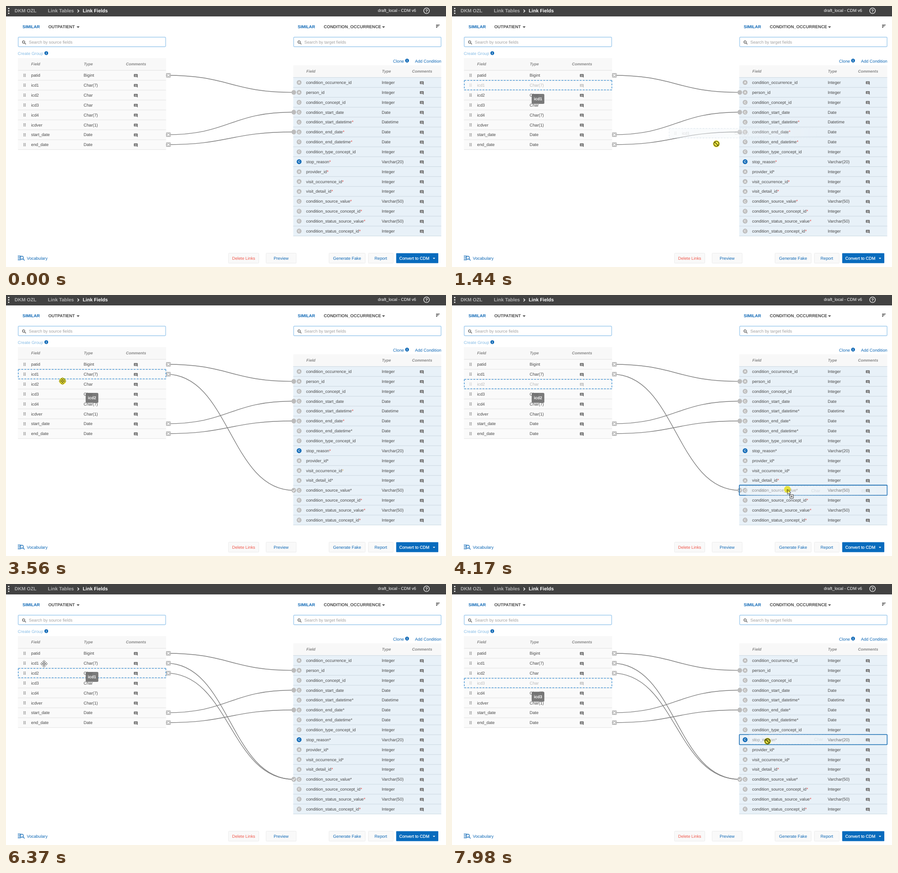
An HTML page that plays this animation: 972 by 576 pixels, repeating every 8 s.

```html
<!DOCTYPE html>
<html lang="en">
<head>
<meta charset="utf-8">
<title>Link Fields</title>
<style>
  html, body { margin: 0; width: 100%; height: 100%; overflow: hidden; background: #fff; }
  svg { display: block; }
  text { font: 9.28px "Liberation Sans", Arial, sans-serif; fill: #484848; text-rendering: geometricPrecision; }
  .b { font-weight: bold; }
  .h { font: italic bold 8.6px "Liberation Sans", Arial, sans-serif; fill: #858585; }
  .top { font-size: 10.6px; font-weight: bold; fill: #b0b0b0; }
  .blue { fill: #0d67b5; }
  .white { fill: #fff; }
  .hint { fill: #a2a2a2; }
  .mid { text-anchor: middle; }
  .badge { font-size: 7px; font-weight: bold; fill: #fff; text-anchor: middle; }
</style>
</head>
<body>
<svg width="972" height="576" viewBox="0 0 972 576">
  <defs>
    <g id="note">
      <path d="M-3.2-3.6h6.6a.8.8 0 0 1 .8.8v7.2l-2-1.9h-5.4a.8.8 0 0 1-.8-.8v-4.5a.8.8 0 0 1 .8-.8z" fill="#5f5f5f"/>
      <path d="M-2.4-1.8h5M-2.4-.3h5M-2.4 1.2h5" stroke="#eee" stroke-width=".7"/>
    </g>
    <g id="grip" fill="#666">
      <path d="M-2.2-3.2h1.5v1.5h-1.5zM.8-3.2h1.5v1.5h-1.5zM-2.2-.7h1.5v1.5h-1.5zM.8-.7h1.5v1.5h-1.5zM-2.2 1.8h1.5v1.5h-1.5zM.8 1.8h1.5v1.5h-1.5z"/>
    </g>
    <g id="lens" fill="none" stroke="#555" stroke-width="1.2">
      <circle cx="-1" cy="-1" r="2.6"/><path d="M1 1l3 3"/>
    </g>
    <g id="info">
      <circle r="4.2" fill="#0d67b5"/><path d="M0-2.4v1.2M0-.4v2.8" stroke="#fff" stroke-width="1.2"/>
    </g>
    <path id="caret" d="M-3.3-1.6h6.6l-3.3 3.4z"/>
    <g id="cross">
      <rect x="-5" y="-5" width="10" height="10" rx="1" fill="#bcbcbc"/>
      <path d="M-2.6-2.6l5.2 5.2M2.6-2.6l-5.2 5.2" stroke="#fff" stroke-width="1.3"/>
    </g>
    <path id="arrow" d="M0 0V11L2.6 8.7 4.6 12.7 6.3 11.9 4.4 8H7.8Z" fill="#fff" stroke="#222" stroke-width=".9"/>
    <g id="copy">
      <use href="#arrow"/>
      <rect x="5.5" y="11.8" width="7.6" height="7.6" fill="#fff" stroke="#222" stroke-width=".9"/>
      <path d="M7.2 15.6h4.2M9.3 13.5v4.2" stroke="#222"/>
    </g>
    <g id="move" fill="#fff" stroke="#444" stroke-width=".8">
      <path d="M0-7.8l3 3.2h-2v2.3h-2v-2.3h-2zM0 7.8l3-3.2h-2v-2.3h-2v2.3h-2zM-7.8 0l3.2-3v2h2.3v2h-2.3v2zM7.8 0l-3.2-3v2h-2.3v2h2.3v2z"/>
      <circle r="1.7"/>
    </g>
    <g id="deny" fill="none" stroke="#333" stroke-width="1.3">
      <circle r="5.6"/><path d="M-4-4l8 8"/>
    </g>
  </defs>
  <g id="fixed"></g>
  <g id="live"></g>
</svg>
<script>
const LOOP = 8000, PITCH = 21.86, LEFT = 142, RIGHT = 157.8;
const BLUE = '#0d67b5', GRAY = '#bcbcbc';
const fixed = document.getElementById('fixed'), live = document.getElementById('live');

const source = ['patid Bigint', 'icd1 Char(7)', 'icd2 Char', 'icd3 Char', 'icd4 Char(7)',
  'icdver Char(1)', 'start_date Date', 'end_date Date'].map(s => s.split(' '));
const target = ['A condition_occurrence_id Integer', 'A person_id Integer', 'C condition_concept_id Integer',
  'C condition_start_date Date', 'C condition_start_datetime* Datetime', 'C condition_end_date* Date',
  'C condition_end_datetime* Date', 'C condition_type_concept_id Integer', 'C stop_reason* Varchar(20)',
  'A provider_id* Integer', 'A visit_occurrence_id* Integer', 'A visit_detail_id* Integer',
  'C condition_source_value* Varchar(50)', 'C condition_source_concept_id* Integer',
  'C condition_status_source_value* Varchar(50)', 'C condition_status_concept_id* Integer'].map(s => s.split(' '));
const leftY = i => LEFT + PITCH * (i + .5);
const rightY = i => RIGHT + PITCH * (i + .5);

// Time from which the asterisk of a row is dark
const darkFrom = {4: 4000, 5: 4000, 6: 1500, 8: 4000, 9: 1400, 10: 4000, 11: 1500, 12: 1700};
// [source row, target row, start]
const links = [[0, 1, 0], [6, 3, 0], [7, 5, 0], [1, 12, 2500], [2, 12, 4790]];
// [source row, start, drop, grab x, grab y]
const drags = [[1, 890, 2500, 102, 175], [2, 3610, 4790, 119, 193], [3, 7540, LOOP, 71, 223]];
// [source row, from, to]
const tips = [[1, 740, 2500], [2, 3260, 4790], [2, 5500, 6050], [1, 6100, 6950], [3, 7250, LOOP]];
const presses = [[740, 2500], [3480, 4790], [7340, LOOP]];
// [time, x, y]
const path = [
  [50, 840, 526], [760, 102, 175], [880, 102, 175], [905, 150, 161], [960, 202, 151], [1100, 330, 139],
  [1400, 560, 285], [1700, 690, 407], [2250, 724, 426], [2500, 724, 426], [3260, 150, 200], [3560, 125, 190],
  [3600, 119, 193], [3620, 119, 193], [3820, 380, 290], [4000, 665, 402], [4100, 735, 426], [4170, 741, 429],
  [4790, 741, 429], [5580, 160, 192], [6370, 84, 176], [6750, 84, 176], [7350, 71, 223], [7530, 71, 223],
  [7700, 300, 265], [7850, 620, 332], [7920, 695, 346.5], [7980, 697, 347], [8100, 697, 347]];

// Smooth curve through the path points, at rest wherever two points agree
function slope(k, c) {
  const a = path[k - 1], p = path[k], b = path[k + 1];
  if (!a || !b || a[c] === p[c] || b[c] === p[c]) return 0;
  return (b[c] - a[c]) / (b[0] - a[0]);
}
function pointer(t) {
  t = Math.max(t, 50);
  const k = path.findIndex(p => p[0] > t) - 1, a = path[k], b = path[k + 1];
  const d = b[0] - a[0], u = (t - a[0]) / d, v = 1 - u;
  return [1, 2].map(c => v * v * (1 + 2 * u) * a[c] + u * u * (1 + 2 * v) * b[c]
    + d * u * v * (v * slope(k, c) - u * slope(k + 1, c)));
}

const text = (x, y, s, cls = '', extra = '') => `<text x="${x}" y="${y + 3.3}" class="${cls}" ${extra}>${s}</text>`;
const use = (id, x, y, extra = '') => `<use href="#${id}" x="${x}" y="${y}" ${extra}/>`;
const rect = (x, y, w, h, fill, extra = '') => `<rect x="${x}" y="${y}" width="${w}" height="${h}" fill="${fill}" ${extra}/>`;
const rule = (x, y, w, c) => rect(x, y - .5, w, 1, c);
// Each side starts its own dash pattern, as a dashed border does
const dashed = (x, y, color, width) => {
  const w = 326, h = PITCH - 1;
  return `<path d="M${x} ${y}h${w}M${x} ${y + h}h${w}M${x} ${y}v${h}M${x + w} ${y}v${h}" fill="none"
    stroke="${color}" stroke-width="${width}" stroke-dasharray="4 2.71"/>`;
};

function search(x, hint) {
  return rect(x - .9, 67.7, 327.4, 23, '#e6f1fa', 'rx="3"')
    + rect(x, 68.7, 325.6, 21, '#fff', 'rx="2" stroke="#a3cdee" stroke-width="1.4"')
    + use('lens', x + 13, 80.5) + text(x + 23.5, 79.5, hint, 'hint');
}
function heading(x, y, h, cols) {
  return rect(x, y, 327, h, '#f8f8f8')
    + ['Field', 'Type', 'Comments'].map((s, i) => text(cols[i], y + 13, s, 'h')).join('');
}
function button(x, w, label, color) {
  return rect(x + .5, 545.5, w - 1, 22, '#f9f9f9', 'rx="1" stroke="#ececec"')
    + text(x + w / 2, 556.5, label, 'mid', `style="fill:${color}"`);
}

fixed.innerHTML = rect(0, 0, 972, 23, '#424242')
  + [5.6, 10.8, 16].map(y => `<circle cx="6" cy="${y}" r="1.5" fill="#fff"/>`).join('')
  + text(19, 11, 'DKM OZL', 'top') + text(92.5, 11, 'Link Tables', 'top')
  + '<path d="M158 8l3 3-3 3" fill="none" stroke="#fff" stroke-width="1.5"/>'
  + text(169.5, 11, 'Link Fields', 'top', 'style="fill:#fff"')
  + text(906, 10, 'draft_local - CDM v6', 'white', 'text-anchor="end"')
  + '<circle cx="929" cy="10.5" r="6.2" fill="none" stroke="#fff" stroke-width="1.3"/>'
  + text(929, 10.7, '?', 'white b mid')
  + text(36.5, 46, 'SIMILAR', 'b blue') + text(93.5, 46, 'OUTPATIENT', 'b', 'style="font-size:9.4px"')
  + use('caret', 159.3, 46.5, 'fill="#444"')
  + text(644.5, 46, 'SIMILAR', 'b blue') + text(702, 46, 'CONDITION_OCCURRENCE', 'b', 'style="font-size:9.5px"')
  + use('caret', 834, 46.5, 'fill="#444"')
  + '<path d="M950 41.8h8M950 44.4h5.6M950 47h3" stroke="#333" stroke-width="1.3"/>'
  + search(27, 'Search by source fields') + search(635.5, 'Search by target fields')
  + text(26, 105, 'Create Group', '', 'style="fill:#86bce6"') + use('info', 89, 104)
  + text(855, 122, 'Clone', 'blue') + use('info', 886, 120.5) + text(903.5, 122, 'Add Condition', 'blue')
  + heading(26.5, 115, 27, [55.5, 172, 265]) + heading(634.5, 131, 27, [663.5, 830.5, 897])
  + rect(634.5, RIGHT, 327, PITCH * 16, '#e8f1f8')
  + target.map(([mark, name, type], i) => {
      const y = rightY(i);
      return rule(634.5, y - PITCH / 2, 327, '#ccd8e1')
        + `<circle cx="647.5" cy="${y}" r="5.3" fill="${i === 8 ? BLUE : GRAY}"/>`
        + text(647.5, y - .8, mark, 'badge') + text(830, y, type) + use('note', 918.4, y + 1);
    }).join('')
  + rule(634.5, RIGHT + PITCH * 16, 327, '#ccd8e1')
  + `<path d="M26 552h7M26 556h5M26 560h7" stroke="${BLUE}" stroke-width="1.4"/>`
  + `<g fill="none" stroke="${BLUE}" stroke-width="1.3"><circle cx="35" cy="555.5" r="3.3"/><path d="M37.5 558l3.5 3.6"/></g>`
  + text(46, 556.5, 'Vocabulary', 'blue')
  + button(491, 68, 'Delete Links', '#f0584c') + button(574, 67.5, 'Preview', BLUE)
  + button(713, 81, 'Generate Fake', BLUE) + button(800, 56, 'Report', BLUE)
  + rect(862, 545.4, 93, 22.2, '#086bbd', 'rx="1"')
  + text(868.7, 556.5, 'Convert to CDM', 'white', 'stroke="#fff" stroke-width=".25"')
  + '<path d="M942.8 555.8h5.4l-2.7 2.8z" fill="#fff"/>';

function sourceRow(i, y, faded) {
  const [name, type] = source[i];
  return `<g opacity="${faded ? .36 : 1}">` + use('grip', 41, y) + text(55.5, y, name)
    + text(171.5, y, type) + use('note', 286.6, y + 1) + '</g>';
}
function starColor(i, t) {
  if (i === 10 && t > 1500 && t < 4000) return '#e5b060';
  return t < darkFrom[i] || !darkFrom[i] || (i === 11 && t > 4000) ? '#e53935' : '#444';
}
function targetName(i, t) {
  const [name, star] = target[i][1].split(/(?=\*)/);
  return text(663, rightY(i), name + (star ? `<tspan fill="${starColor(i, t)}">*</tspan>` : ''));
}
function link([from, to]) {
  const a = leftY(from), b = rightY(to);
  return `<path d="M353.5 ${a}C494.5 ${a} 494.5 ${b} 635.5 ${b}" fill="none" stroke="#7e7e7e" stroke-width="1.4"/>`
    + use('cross', 358.7, a) + `<circle cx="635.7" cy="${b}" r="5.2" fill="${GRAY}"/>`
    + (to === 12 ? `<path d="M633 ${b}l2 2 3.6-4" fill="none" stroke="#fff" stroke-width="1.2"/>` : '');
}
function ghost([row, , , gx, gy], [x, y]) {
  const top = leftY(row) - PITCH / 2;
  return `<radialGradient id="fade" gradientUnits="userSpaceOnUse" cx="${gx}" cy="${gy}" r="270">
    <stop stop-color="#fff" stop-opacity=".55"/><stop offset=".35" stop-color="#fff" stop-opacity=".32"/>
    <stop offset="1" stop-color="#fff" stop-opacity="0"/></radialGradient>
    <mask id="soft" maskUnits="userSpaceOnUse" x="20" y="${top - 4}" width="340" height="30">
    ${rect(20, top - 4, 340, 30, 'url(#fade)')}</mask>
    <g transform="translate(${x - gx} ${y - gy})"><g mask="url(#soft)">`
    + rect(27, top, 326, PITCH, '#f3f7fa') + dashed(27.2, top + .5, '#b5c8d6', 1)
    + sourceRow(row, top + PITCH / 2, true) + '</g></g>';
}
const inLeft = ([x, y]) => x > 26 && x < 354 && y > LEFT && y < LEFT + PITCH * 8;
const inRight = ([x, y]) => x > 634 && x < 962 && y > RIGHT && y < RIGHT + PITCH * 16;

function draw(t) {
  const p = pointer(t), during = ([, a, b]) => t >= a && t < b;
  const drag = drags.find(during), last = drags.filter(d => t >= d[1]).pop();
  const pressed = presses.some(([a, b]) => t >= a && t < b);
  const insert = drag && inLeft(p) && p[1] < LEFT + PITCH;
  let s = rect(26.5, LEFT, 327, PITCH * 8 + (insert ? 1 : 0), '#fafafa');

  source.forEach((_, i) => {
    const y = leftY(i) + (insert && i ? 1.2 : 0);
    s += rule(26.5, y - PITCH / 2, 327, '#e2e2e2') + sourceRow(i, y, drag && drag[0] === i);
  });
  s += rule(26.5, LEFT + PITCH * 8 + (insert ? 1.2 : 0), 327, '#e2e2e2');
  if (insert) s += rect(26.5, LEFT + PITCH - .8, 327, 2, '#1d3954');
  target.forEach((_, i) => s += targetName(i, t));
  links.filter(l => t >= l[2]).forEach(l => s += link(l));
  if (last) s += dashed(27.2, leftY(last[0]) - PITCH / 2 + (insert ? 1.7 : .5), '#4f9bd8', 1.5);

  if (drag && inRight(p)) {
    const row = Math.floor((p[1] - RIGHT) / PITCH);
    s += rect(634.7, RIGHT + row * PITCH - .5, 326.6, PITCH + .5, 'none', 'stroke="#1a6fb5" stroke-width="1.6" rx="1"');
  }
  if (drag) s += ghost(drag, pointer(Math.max(t - 50, drag[1] - 10)));

  const tip = tips.find(during);
  if (tip) {
    const y = leftY(tip[0]) + 30.3;
    s += rect(176, y - 11, 28, 22, '#6c6c6c', 'rx="2.5" opacity=".9"')
      + text(190, y, source[tip[0]][0], 'white mid b', 'style="font-size:9px"');
  }
  if (t >= 50) {
    // The drag cursor reacts a little late
    const before = pointer(t - 150);
    const kind = drag ? (inLeft(before) || inRight(before) ? 'copy' : 'deny')
      : inLeft(p) ? 'move' : 'arrow';
    s += use(kind, p[0], p[1]);
    if (pressed) s += `<circle cx="${p[0]}" cy="${p[1]}" r="7.6" fill="#f6ec3c" style="mix-blend-mode:multiply"/>`;
  }
  live.innerHTML = s;
}

function tick() {
  draw(performance.now() % LOOP);
  requestAnimationFrame(tick);
}
tick();
</script>
</body>
</html>
```
